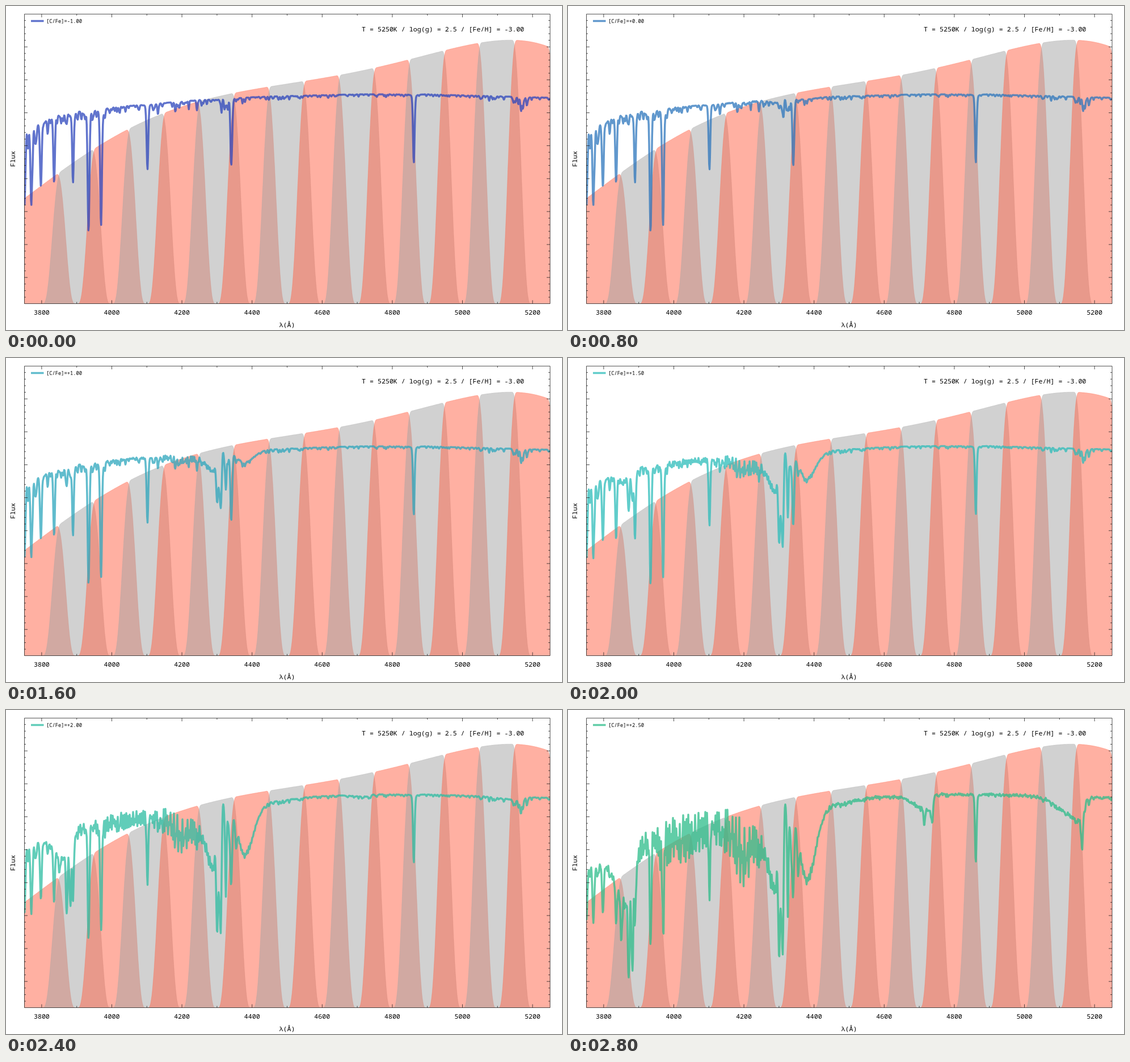
An HTML page for the animation above (3 s loop, 980 px wide and 572 px high).

```html
<!DOCTYPE html>
<html lang="en">
<head>
<meta charset="utf-8">
<title>Carbon abundance in a stellar spectrum</title>
<style>
html, body { margin: 0; width: 100%; height: 100%; overflow: hidden; background: #fff; }
svg { display: block; width: 980px; height: 572px; }
text { font: 11.65px "Noto Sans Mono", "DejaVu Sans Mono", monospace; fill: #000; }
.small { font-size: 8.75px; }
.mid { text-anchor: middle; }
</style>
</head>
<body>
<svg viewBox="0 0 980 572">
  <defs><clipPath id="plot"><rect x="32" y="14" width="927" height="511.5"/></clipPath></defs>
  <g id="filters" clip-path="url(#plot)"></g>
  <g fill="none" stroke-width="3.5" stroke-linejoin="round" stroke-opacity=".75">
    <path id="curve" clip-path="url(#plot)"/>
    <path id="key" d="M44 26.5H66.5"/>
  </g>
  <path id="axes" fill="none" stroke="#222" stroke-width=".8"/>
  <g id="labels"></g>
  <text id="legend" class="small" x="71" y="30"></text>
  <text x="627" y="44.6">T = 5250K / log(g) = 2.5 / [Fe/H] = -3.00</text>
  <text class="mid" x="495.5" y="566.5">λ(Å)</text>
  <text class="mid" transform="translate(16 270) rotate(-90)">Flux</text>
</svg>
<script>
const LEFT = 32, RIGHT = 959, TOP = 14, BOTTOM = 525.5;
const STEP_MS = 200, STEPS = 15;
const $ = id => document.getElementById(id);
const px = wave => LEFT + (wave - 3750) * 0.618;
const clamp = v => Math.max(0, Math.min(1, v));
const ease = v => { v = clamp(v); return v * v * v * (v * (6 * v - 15) + 10); };
const bell = u => Math.exp(-u * u / 2);
const logistic = v => 1 / (1 + Math.exp(-v));

function lerp(points, x) {
  let i = 1;
  while (i < points.length - 1 && x > points[i][0]) i++;
  const [x0, y0] = points[i - 1], [x1, y1] = points[i];
  return y0 + (y1 - y0) * clamp((x - x0) / (x1 - x0));
}

// Smooth polynomial through a few points.
function poly(points, x) {
  return points.reduce((sum, [xi, yi]) =>
    sum + points.reduce((p, [xj]) => xj === xi ? p : p * (x - xj) / (xi - xj), yi), 0);
}

function randoms(seed) {
  return () => {
    seed = (seed * 1664525 + 1013904223) >>> 0;
    return seed / 4294967296;
  };
}

// ---- filter bands, axes and labels ----
const envelope = [[32, 340], [94, 294], [187, 233], [403, 153.5], [681, 102], [959, 73]];

function bandPath(center) {
  let d = "";
  for (let o = -98; o <= 96; o++) {
    const pass = ease((o + 97) / 53) * (1 - ease((o - 41) / 54));
    const x = px(center + o);
    const y = BOTTOM - (BOTTOM - poly(envelope, x)) * pass;
    d += (d ? "L" : "M") + x.toFixed(1) + " " + y.toFixed(1);
  }
  return d + "Z";
}

function drawStatic() {
  let bands = "";
  for (let i = 0; i < 15; i++) {
    const color = i % 2 ? "#a3a3a3" : "#ff6347";
    bands += `<path d="${bandPath(3800 + 100 * i)}" fill="${color}" fill-opacity=".5" ` +
      `stroke="${color}" stroke-opacity=".4" stroke-width=".8"/>`;
  }
  $("filters").innerHTML = bands;

  let d = `M${LEFT + .5} ${TOP + .3}H${RIGHT}V${BOTTOM}H${LEFT + .5}Z`;
  let labels = "";
  for (let w = 3800; w <= 5200; w += 100) {
    const major = w % 200 === 0, len = major ? 6 : 3, x = px(w).toFixed(1);
    d += `M${x} ${TOP}v${len}M${x} ${BOTTOM}v${-len}`;
    if (major) labels += `<text class="mid" x="${x}" y="545">${w}</text>`;
  }
  for (let i = 1; i < 44; i++) {
    const len = i % 5 ? 3 : 6, y = (TOP + i * 11.63).toFixed(1);
    d += `M${LEFT} ${y}h${len}M${RIGHT} ${y}h${-len}`;
  }
  $("axes").setAttribute("d", d);
  $("labels").innerHTML = labels;
}

// ---- spectrum ----
const continuum = [
  [32, 219], [98, 189], [187, 179], [350, 165], [450, 160], [620, 156], [740, 156], [959, 162]
];

// Strong lines as [x, depth, width]: Balmer series, Ca K and H, Mg b.
const atoms = [
  [px(3933.7), 214, 1.5], [px(3968.5), 108, 1.5],
  [px(5167.3), 24, 1.2], [px(5172.7), 19, 1], [px(5183.6), 14, 1]
];
for (let n = 4; n <= 12; n++)
  atoms.push([px(3646 * n * n / (n * n - 4)), 135 - 3.5 * n, 1.35]);

// Bands as [x, full depth, blue width, red width, half-strength abundance].
const molecules = {
  CH: { rate: 2, bands: [
    [345, 110, 45, 14, 2], [366, 150, 9, 3, 1.7], [372, 260, 1.6, 2, 1.4],
    [378.5, 290, 2.5, 1.4, 1.35], [387.5, 225, 1.2, 1.2, 1.5], [394, 150, 1.8, 3, 2.3],
    [405.5, 110, 1.5, 1.5, 2.4], [420, 185, 12, 16, 2], [445, 20, 20, 60, 2.2]
  ] },
  CN: { rate: 3, bands: [
    [48, 110, 40, 25, 2.5], [94, 120, 1.5, 1.5, 2.3], [103, 200, 20, 14, 2.3],
    [107, 155, 1.3, 1.3, 1.7], [113.5, 175, 1.5, 1.5, 1.85], [175, 110, 50, 60, 2.5],
    [318, 45, 22, 1.5, 2.4]
  ] },
  C2: { rate: 6, bands: [
    [628, 45, 1.3, 1.3, 2.4], [638, 45, 26, 4, 2.4], [642, 50, 1.5, 1.5, 2.4],
    [900, 60, 30, 6, 2.4], [906, 100, 1.5, 1.2, 2.4]
  ] }
};
const bands = Object.values(molecules).flatMap(m => m.bands.map(b => [...b, m.rate]));

const rnd = randoms(4271);
const metals = Array.from({ length: 420 }, () => {
  const x = LEFT + 927 * Math.pow(rnd(), 1.3);
  const limit = 3 + 24 * Math.exp((LEFT - x) / 150) +
    12 * bell((x - 370) / 60) + 5 * bell((x - 920) / 60);
  return [x, limit * Math.pow(rnd(), 2.3), 0.7 + 0.4 * rnd()];
});
const grain = Array.from({ length: 640 }, (_, i) => (i % 2 ? 1 : -1) * rnd());

function absorb(lines, x, wings) {
  return lines.reduce((sum, [c, depth, w]) => {
    const u = (x - c) / w;
    return Math.abs(u) > 14 ? sum
      : sum + depth * ((1 - wings) * bell(u) + wings / (1 + u * u / 4));
  }, 0);
}

function jag(x) {
  const p = (x - LEFT) / 1.5, i = Math.floor(p);
  return grain[i] + (grain[i + 1] - grain[i]) * (p - i);
}

const samples = [];
for (let x = LEFT; x <= RIGHT; x += 0.75) {
  samples.push({
    x,
    base: lerp(continuum, x),
    strong: absorb(atoms, x, 0.07),
    weak: absorb(metals, x, 0),
    bands: bands.map(([c, depth, blue, red]) => depth * bell((x - c) / (x < c ? blue : red))),
    jag: jag(x),
    rough: 0.06 + 0.8 * Math.exp(-Math.pow((x - 235) / 105, 6)),
    red: clamp((x - 250) / 280)
  });
}

function spectrum(c) {
  const strength = bands.map(b => logistic(b[5] * (c - b[4])));
  const noise = 3 * logistic(6 * (c - 2.4));
  const lift = 7.5 * logistic(10 * (c - 1.75));
  return "M" + samples.map(s => {
    const mol = s.bands.reduce((sum, depth, i) => sum + depth * strength[i], 0);
    const strong = s.strong * clamp(1 - mol / 310);
    const weak = s.weak * clamp(1 - mol / 150);
    const y = s.base - lift * s.red + strong + weak +
      mol * (1 + s.rough * s.jag) + noise * s.jag;
    return s.x.toFixed(2) + " " + y.toFixed(1);
  }).join("L");
}

let shown = -1;
function update(ms) {
  const step = Math.floor(ms / STEP_MS) % STEPS;
  if (step === shown) return;
  shown = step;
  const c = -1 + step * 0.25;
  const color = `hsl(${229 - 5 * step} 62% 45.5%)`;
  $("curve").setAttribute("d", spectrum(c));
  $("curve").setAttribute("stroke", color);
  $("key").setAttribute("stroke", color);
  $("legend").textContent = `[C/Fe]=${c < 0 ? "-" : "+"}${Math.abs(c).toFixed(2)}`;
}

drawStatic();
update(0);
const start = performance.now();
function tick() {
  update(performance.now() - start);
  requestAnimationFrame(tick);
}
requestAnimationFrame(tick);
</script>
</body>
</html>
```
